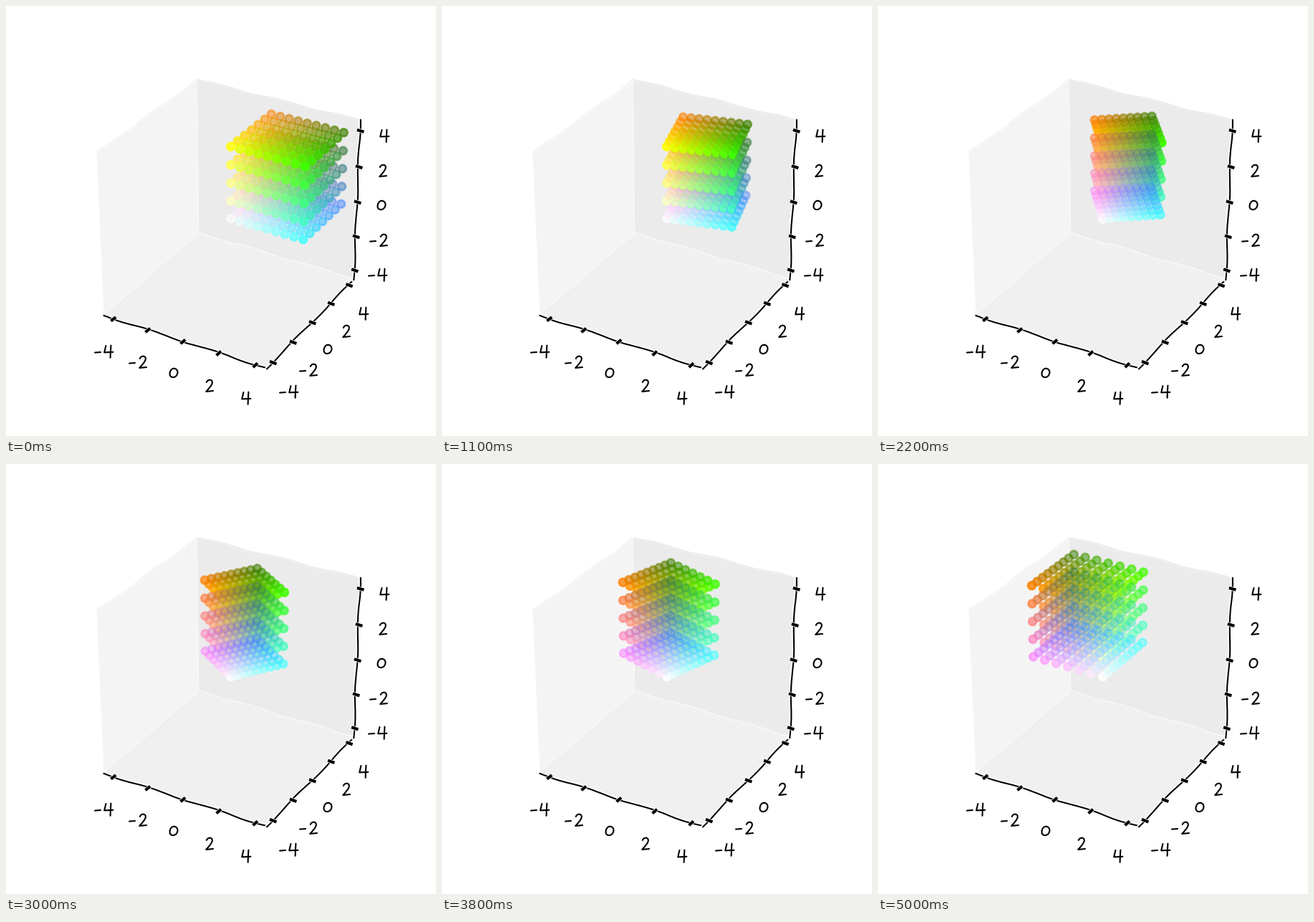
These frames come from a looping animation (600x600 px, 5.1 s). A matplotlib script:

```python
import itertools

import matplotlib.pyplot as plt
import matplotlib.patheffects as pe
import numpy as np
from matplotlib.animation import FuncAnimation
from matplotlib.patches import PathPatch, Polygon
from matplotlib.path import Path

SIZE, DPI = 600, 100
STEPS = 50
LIMIT = 4.4                  # data range on each axis
EDGE = LIMIT * 25 / 24       # the panes sit slightly outside it
DIST = 10                    # camera distance
HALO = [pe.withStroke(linewidth=4, foreground="w")]

ELEV, AZIM = np.radians(30), np.radians(-60)
RIGHT = np.array([-np.sin(AZIM), np.cos(AZIM), 0])
UP = np.array([-np.sin(ELEV) * np.cos(AZIM),
               -np.sin(ELEV) * np.sin(AZIM), np.cos(ELEV)])
TOWARD = np.cross(RIGHT, UP)


def project(points):
    """Perspective view: pixel positions (y down) and camera depth."""
    rel = np.asarray(points, float) / (2 * LIMIT)
    depth = DIST - rel @ TOWARD
    px = 75 + 465 * (rel @ RIGHT / depth + 0.095) / 0.185
    py = SIZE - 66 - 462 * (rel @ UP / depth + 0.095) / 0.185
    return np.column_stack([px, py]), depth


fig = plt.figure(figsize=(SIZE / DPI, SIZE / DPI), dpi=DPI, facecolor="white")
ax = fig.add_axes([0, 0, 1, 1])
ax.set_xlim(0, SIZE)
ax.set_ylim(SIZE, 0)
ax.axis("off")


# ---- cube and axes ----
def roughen(artist):
    artist.set_sketch_params(1, 100, 2)
    artist.set_path_effects(HALO)


def draw_pane(corners, grey):
    xy, _ = project(np.array(corners) * EDGE)
    pane = Polygon(xy, closed=False, facecolor=(grey,) * 3,
                   edgecolor=(grey,) * 3, alpha=0.5, linewidth=1, zorder=1)
    roughen(ax.add_patch(pane))


def draw_line(ends, width, order):
    xy, _ = project(ends)
    line, = ax.plot(xy[:, 0], xy[:, 1], color="black", linewidth=width,
                    solid_capstyle="projecting", zorder=order)
    roughen(line)


def draw_axis(start, axis, tick_axis, sign, order):
    """Line from a cube corner to the opposite end of one axis, with ticks."""
    start = np.array(start) * EDGE
    end = start.copy()
    end[axis] *= -1
    draw_line([start, end], 1.5, order)
    delta = 2 * LIMIT / 12
    for value in range(-4, 5, 2):
        inner, outer = start.copy(), start.copy()
        inner[axis] = outer[axis] = value
        inner[tick_axis] += 0.1 * sign * delta
        outer[tick_axis] -= 0.2 * sign * delta
        draw_line([inner, outer], 3, order + 0.1)


draw_pane([(-1, -1, -1), (-1, 1, -1), (-1, 1, 1), (-1, -1, 1)], 0.95)
draw_pane([(-1, 1, -1), (1, 1, -1), (1, 1, 1), (-1, 1, 1)], 0.90)
draw_pane([(-1, -1, -1), (1, -1, -1), (1, 1, -1), (-1, 1, -1)], 0.925)
draw_axis((-1, -1, -1), 0, 1, 1, 2)
draw_axis((1, 1, -1), 1, 0, -1, 3)
draw_axis((1, 1, -1), 2, 0, -1, 4)


# ---- handwritten tick labels ----
M, L, C = Path.MOVETO, Path.LINETO, Path.CURVE4
GLYPHS = {
    "-": ([(-4, 0.6), (4, 0)], [M, L]),
    "0": ([(0.8, -6.2), (-3.5, -6.6), (-6, -1.5), (-5.4, 2.4),
           (-4.8, 6.6), (0.4, 7.2), (3.2, 4.4),
           (6.6, 1), (6.4, -5.4), (0.8, -6.2)], [M] + [C] * 9),
    "2": ([(-4.2, -5), (-2.6, -9.4), (4, -9.6), (3.8, -4.6),
           (3.6, -0.8), (-1.6, 4.4), (-4.8, 8), (5, 7)],
          [M] + [C] * 6 + [L]),
    "4": ([(-3.6, -8), (-4.4, -4.6), (-5, -2), (-5.8, 1.4), (6.4, 0.8),
           (3.4, -8.4), (3.2, -2), (2.6, 3), (2.6, 8.8)],
          [M, C, C, C, L, M, C, C, C]),
}


def draw_glyph(char, x, y):
    points, codes = GLYPHS[char]
    ax.add_patch(PathPatch(Path(np.array(points) + (x, y), codes),
                           facecolor="none", edgecolor="black", linewidth=1.5,
                           capstyle="round", joinstyle="round", zorder=5))


def draw_label(value, x, y):
    if value < 0:
        draw_glyph("-", x - 9, y + 1)
        x += 6
    draw_glyph(str(abs(value)), x, y)


LABELS = [
    [(137, 482), (185, 497), (234, 512), (284, 530), (335, 547)],
    [(395, 538), (423, 508), (449, 479), (475, 454), (499, 429)],
    [(519, 375), (521, 327), (524, 278), (526, 230), (528, 181)],
]
for row in LABELS:
    for value, (x, y) in zip(range(-4, 5, 2), row):
        draw_label(value, x, y)


# ---- point lattice ----
grid = np.array(list(itertools.product(np.linspace(0, 4, 9),
                                       np.linspace(0, 4, 7),
                                       np.linspace(0, 4, 5))))
rgb = 1 - grid / 4 * (0.75, 0.5, 1)
quarter_turn = np.array([[0, -1, 0], [1, 0, 0], [0, 0, 1]])
dots = ax.scatter(grid[:, 0], grid[:, 1], s=60, c=rgb, linewidths=2, zorder=6)


def update(frame):
    matrix = np.eye(3) + frame / STEPS * (quarter_turn - np.eye(3))
    xy, depth = project(grid @ matrix.T)
    far = -1 / depth
    alpha = 1 - 0.7 * (far - far.min()) / np.ptp(far)
    colors = np.column_stack([rgb, alpha])
    dots.set_offsets(xy)
    dots.set_facecolor(colors)
    dots.set_edgecolor(colors)
    return (dots,)


anim = FuncAnimation(fig, update, frames=STEPS + 1, interval=100,
                     repeat=True, repeat_delay=0)
plt.show()
```
